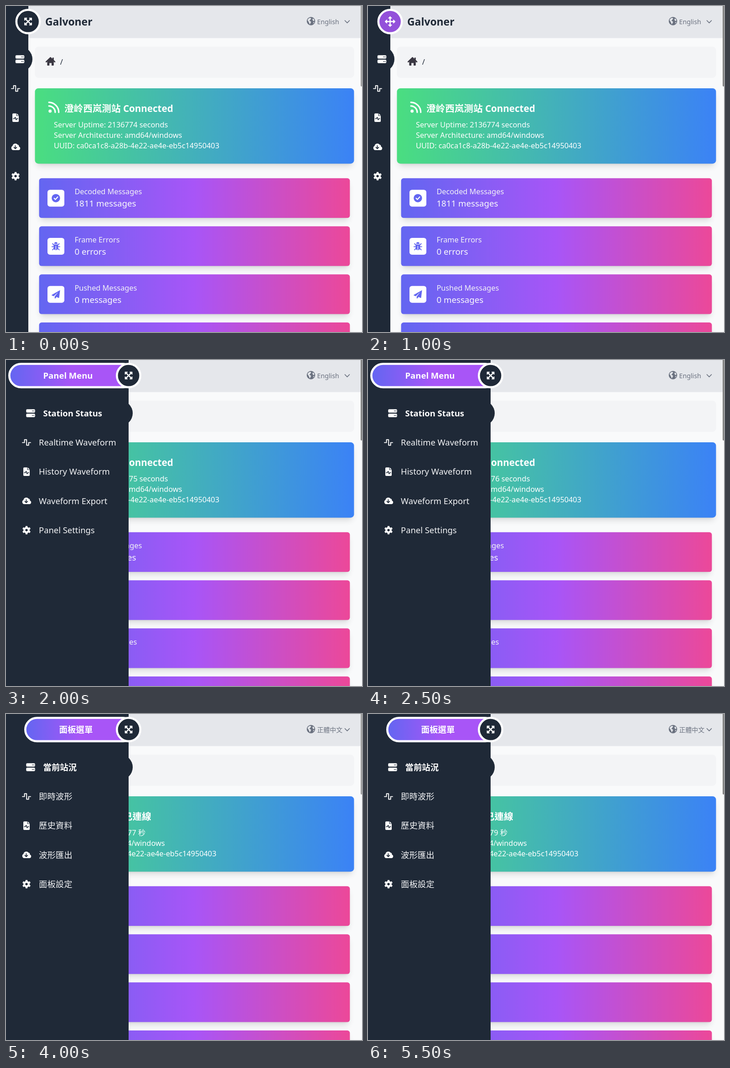
Recreate the animation shown at these times as an HTML page. Size 781x717 px, loop 6 s.

```html
<!DOCTYPE html>
<html lang="en">
<head>
<meta charset="utf-8">
<style>
html, body { margin: 0; width: 100%; height: 100%; overflow: hidden; background: #f9fafb; }
svg { display: block; width: 781px; height: 717px; }
text { font-family: 'Noto Sans', 'Noto Sans CJK SC', sans-serif; white-space: pre; }
[lang=zh-TW] { font-family: 'Noto Sans', 'Noto Sans CJK TC', sans-serif; }
[lang=ja] { font-family: 'Noto Sans', 'Noto Sans CJK JP', sans-serif; }
[lang=ko] { font-family: 'Noto Sans', 'Noto Sans CJK KR', sans-serif; }
</style>
</head>
<body>
<svg viewBox="0 0 781 717">
  <defs>
    <linearGradient id="sea"><stop stop-color="#4ade80"/><stop offset="1" stop-color="#3b82f6"/></linearGradient>
    <linearGradient id="berry"><stop stop-color="#6366f1"/><stop offset=".5" stop-color="#a855f7"/><stop offset="1" stop-color="#ec4899"/></linearGradient>
    <linearGradient id="grape"><stop stop-color="#6366f1"/><stop offset=".5" stop-color="#a855f7"/></linearGradient>
    <filter id="soft" x="-10%" y="-50%" width="120%" height="200%"><feGaussianBlur stdDeviation="7"/></filter>
    <filter id="near" x="-10%" y="-50%" width="120%" height="200%"><feGaussianBlur stdDeviation="2.7"/></filter>
  </defs>
  <g id="scene"></g>
</svg>
<script>
const DARK = '#1f2937', INDIGO = '#6366f1', GRAY = '#6b7280';
const scene = document.getElementById('scene');

const rect = (x, y, w, h, fill, r = 0, more = '') =>
  `<rect x="${x}" y="${y}" width="${w}" height="${h}" rx="${r}" fill="${fill}" ${more}/>`;
const text = (x, y, str, size, fill = '#fff', more = '') =>
  `<text x="${x}" y="${y}" font-size="${size}" fill="${fill}" ${more}>${str}</text>`;
const line = (d, color, width, more = '') =>
  `<path d="${d}" fill="none" stroke="${color}" stroke-width="${width}" ${more}/>`;
const shape = (d, fill) => `<path d="${d}" fill="${fill}"/>`;
const dot = (x, y, r, fill) => `<circle cx="${x}" cy="${y}" r="${r}" fill="${fill}"/>`;
const at = (x, y, body, more = '') => `<g transform="translate(${x} ${y}) ${more}">${body}</g>`;
const spin = (n, body) =>
  Array.from({ length: n }, (_, k) => `<g transform="rotate(${k * 360 / n})">${body}</g>`).join('');

const BOLD = 'font-weight="700"', ROUND = 'stroke-linecap="round" stroke-linejoin="round"';
const TC = 'lang="zh-TW"';

const icons = {
  arrows: spin(4, line('M0 0 6-6', '#fff', 2.6) +
    shape('M2.6-8.4H7.6Q8.4-8.4 8.4-7.6V-2.6Q8-1.6 7-2.4L2.4-7Q1.6-8 2.6-8.4z', '#fff')),
  server: [-8.8, 1.1].map(y => rect(-9.7, y, 19.4, 7.6, '#fff', 2.2) +
    dot(4, y + 3.8, 1, DARK) + dot(7, y + 3.8, 1, DARK)).join(''),
  wave: line('M-9 .3H-4.4V-6H.2V6.2H4.7V.3H9', '#fff', 1.9, ROUND),
  file: shape('M-5-9.3H1.5V-4.2H7V7.4Q7 9.3 5 9.3H-5Q-7 9.3-7 7.4V-7.4Q-7-9.3-5-9.3zM2.6-9.3 7-5.2H2.6z', '#fff') +
    line('M-5 2.2H-2.6L-.8-1 1.2 5 2.8 2.2H5', DARK, 1.5, ROUND),
  cloud: shape('M-5 7.2A5 5 0 0 1-6.6-2.2 6.2 6.2 0 0 1 4.2-5.2 3.8 3.8 0 0 1 7.4-.6 4 4 0 0 1 6 7.2z', '#fff') +
    line('M-.6-2.8V3.8M-3.6 1-.6 4 2.4 1', DARK, 1.8, ROUND),
  gear: '<circle r="4.8" fill="none" stroke="#fff" stroke-width="4.2"/>' +
    spin(6, rect(-2.2, -9.2, 4.4, 4, '#fff', 1)),
  check: dot(0, 0, 9.2, INDIGO) + line('M-3.8.2-1 3 4-2.6', '#fff', 2.2, ROUND),
  bug: line('M-8.6 1H8.6M-7.4-5.6-3.6-2.4M7.4-5.6 3.6-2.4M-7.4 8-3.6 4.4M7.4 8 3.6 4.4', INDIGO, 1.9, ROUND) +
    shape('M-5-3.8H5V3A5 6 0 0 1-5 3zM-3.6-5A3.6 4.2 0 0 1 3.6-5z', INDIGO) +
    line('M0-.6V9', '#fff', 1.3),
  plane: shape('M9.2-9.2-8.8 1.2Q-9.8 2-8.6 2.6L-4.6 4.2 5.2-5.2-2.6 5V8.6Q-2 9.8-1 8.8L1.4 6 6 8Q7 8.2 7.2 7.2z', INDIGO),
  home: line('M-9.4 1.2 0-8 9.4 1.2', '#3a3742', 2.6, ROUND) +
    shape('M-7.2.2 0-7 7.2.2V8.6Q7.2 9.4 6.4 9.4H2.4V4H-2.4V9.4H-6.4Q-7.2 9.4-7.2 8.6zM4.2-8.2H7.2V-2H4.2z', '#3a3742'),
  rss: dot(4.2, 21.2, 3.4, '#fff') +
    line('M1.6 9.8A14 14 0 0 1 15.4 23.8M1.6 1.8A22 22 0 0 1 23.2 23.8', '#fff', 3.2, ROUND),
  globe: dot(0, 0, 9.2, GRAY) +
    shape('M-7.6-2.6-4.4-6.6-.8-7.4.6-5-1.6-3.2-2.6-1-5-.2-2-.2.4 1.6-.8 4-2.4 7.4-3.8 4.2-5 1.6zM3.2-5 5.6-5.6 7.6-2.4 6.6-.2 4.2-.8zM5 2.2 7.6 1.6 5.2 5.6z', '#e5e7eb'),
};

const menuIcons = ['server', 'wave', 'file', 'cloud', 'gear'];
const rowY = k => 117 + k * 64.3;
const words = {
  en: { title: 'Panel Menu', left: 5, lang: 'English',
    menu: ['Station Status', 'Realtime Waveform', 'History Waveform', 'Waveform Export', 'Panel Settings'] },
  tc: { title: '面板選單', left: 40, lang: '正體中文',
    menu: ['當前站況', '即時波形', '歷史資料', '波形匯出', '面板設定'] },
};

const card = (x, y, w, h, r, fill) =>
  rect(x + 3, y + 12, w - 6, h - 6, '#000', r, 'opacity=".12" filter="url(#soft)"') +
  rect(x + 4, y + 7, w - 8, h - 7, '#000', r, 'opacity=".1" filter="url(#near)"') +
  rect(x, y, w, h, fill, r);

function banner(seconds, chinese) {
  const id = 'ca0ca1c8-a28b-4e22-ae4e-eb5c14950403';
  const rows = chinese
    ? [[306, `運行時間：${seconds} 秒`], [348.5, '架構：amd64/windows'], [461.5, `UUID：${id}`]]
    : [[105, `Server Uptime: ${seconds} seconds`], [105, 'Server Architecture: amd64/windows'], [105, `UUID: ${id}`]];
  return card(63.5, 181, 700, 165.7, 7.3, 'url(#sea)') + at(92.5, 210, icons.rss) +
    text(128, 233.3, '澄岭西岚测站 ' + (chinese ? `<tspan ${TC}>已連線</tspan>` : 'Connected'), 20.6, '#fff', BOLD) +
    rows.map(([x, s], k) => text(x, 267 + k * 23, s, 16.3, '#fff', chinese ? TC + ' text-anchor="end"' : '')).join('');
}

function cards(decoded, chinese) {
  const list = [['check', 'Decoded Messages', decoded + ' messages'], ['bug', 'Frame Errors', '0 errors'],
    ['plane', 'Pushed Messages', '0 messages'], ['', '', '']];
  return list.map(([icon, label, value], k) => {
    const y = 378.8 + k * 105.75;
    return card(72.6, y, 681.8, 87.2, 5.5, 'url(#berry)') + (icon && !chinese
      ? rect(91, y + 25.4, 37, 37, '#fff', 5.5) + at(109.4, y + 43.8, icons[icon]) +
        text(150.4, y + 35.6, label, 16.3, '#f3f4f6') + text(150.4, y + 62.4, value, 18.7, '#f9fafb')
      : '');
  }).join('');
}

const ring = (x, fill, turn) =>
  at(x, 34.2, `<circle r="25.7" fill="${fill}" stroke="#fff" stroke-width="4.6"/>` +
    `<g transform="rotate(${turn})">${icons.arrows}</g>`);

const bulge = edge => rect(edge - 300, 0, 300, 717, DARK) + dot(edge - 19, 117, 28, DARK);

const closed = hover => bulge(49) +
  menuIcons.map((n, k) => at(k ? 21 : 30.5, rowY(k), icons[n])).join('') +
  ring(48.5, hover ? '#9350da' : DARK, hover ? 45 : 0);

function drawer(w, shift, lang) {
  const sliding = shift < 0;
  const pill = rect(w.left + 2.3, 8.5, 280.7 - w.left, 51.4, 'url(#grape)', 25.7, 'stroke="#fff" stroke-width="4.6"') +
    text(w.left + 76.5, 41, w.title, 18.5, '#fff', BOLD + lang);
  return bulge(269 + shift) +
    at(shift, 0, menuIcons.map((n, k) => at(k ? 45 : 54, rowY(k), icons[n]) +
      text(k ? 72 : 81.5, rowY(k) + 6.8, w.menu[k], 18.4, k ? '#f3f4f6' : '#fff', (k ? '' : BOLD) + lang)).join('')) +
    at(sliding ? 14.5 : 0, 0, pill, sliding ? 'scale(.49 1)' : '') +
    ring(269 + shift, sliding ? '#894dcb' : DARK, sliding ? 45 : 0);
}

function dropdown() {
  const items = [['简体中文', 'zh-CN'], ['正體中文', 'zh-TW'], ['English', 'en'], ['한국어', 'ko'], ['日本語', 'ja']];
  return rect(683, 45, 79, 159, '#000', 6, 'opacity=".25" filter="url(#near)"') +
    rect(683.5, 43.5, 78.5, 159, '#eff0f1', 6, 'stroke="#c3c5c7"') +
    rect(687, 78.5, 71, 30, '#3daee9', 3.5) +
    items.map(([s, lang], k) => text(693.5, 69.2 + k * 30, s, k === 2 ? 14.2 : 13.9,
      k === 1 ? '#fff' : '#232629', `lang="${lang}"`)).join('');
}

function draw(step) {
  const chinese = step > 7;
  const w = chinese ? words.tc : words.en, lang = chinese ? ' ' + TC : '';
  const seconds = 2136774 + Math.max(0, Math.floor((step - 1) / 2));
  const bar = ['#a3a3a3', '#939393'][step % 8] || '#868686';

  scene.innerHTML = rect(0, 0, 781, 717, '#f9fafb') + rect(0, 0, 781, 70.5, '#e5e7eb') +
    text(86, 43, 'Galvoner', 22.9, DARK, BOLD) +
    at(669, 33.3, icons.globe) +
    text(682.5, chinese ? 40 : 39.5, w.lang, chinese ? 13.9 : 14.2, GRAY, lang) +
    line('M743.5 32 748.5 37.2 753.5 32', GRAY, 1.7, ROUND) +
    rect(63.5, 89.5, 700, 68.3, '#f3f4f6', 7.3) +
    at(97.6, 121.6, icons.home) + text(118.8, 129, '/', 16.3, DARK) +
    banner(seconds, chinese) + cards(step < 3 ? 1811 : 1812, chinese) +
    rect(778, -4, 6, 181, bar, 2) +
    (step < 3 ? closed(step === 2) : drawer(w, step === 3 ? -117 : 0, lang)) +
    (step === 6 || step === 7 ? dropdown() : '');
}

let shown = -1;
function tick() {
  const step = Math.floor(performance.now() % 6000 / 500);
  if (step !== shown) draw(shown = step);
  requestAnimationFrame(tick);
}
tick();
</script>
</body>
</html>
```
